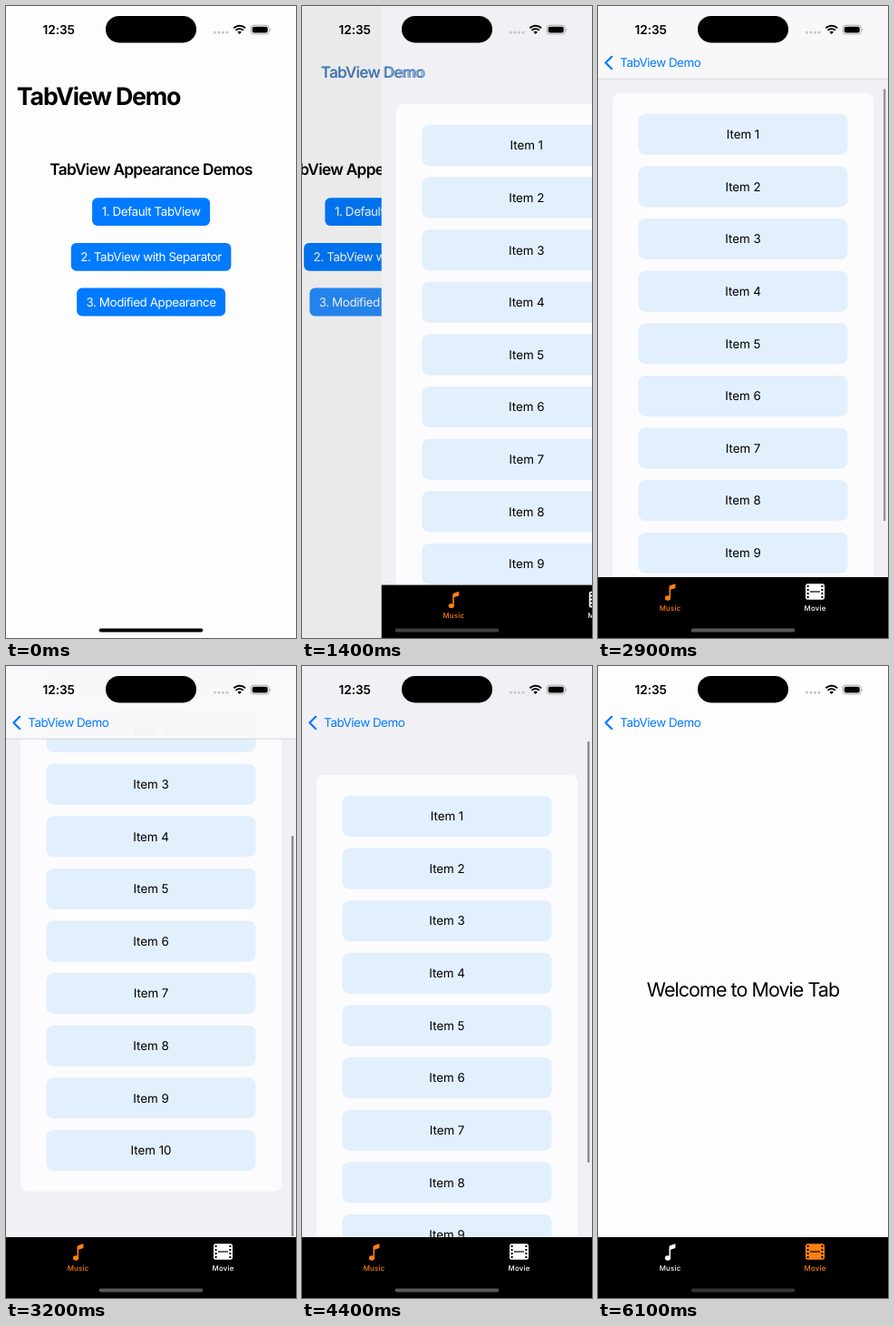
These frames come from a looping animation (320x696 px, 6.5 s). An HTML page:

```html
<!DOCTYPE html>
<html lang="en">
<head>
<meta charset="utf-8">
<title>Tab demo</title>
<style>
  html, body { margin: 0; height: 100%; overflow: hidden; background: #fdfdfe; }
  svg { display: block; width: 100vw; height: 100vh; }
  text {
    font: 13.4px Inter, "Open Sans", sans-serif;
    font-optical-sizing: none;
    text-rendering: geometricPrecision;
  }
  .mid { text-anchor: middle; }
  .heading { font-size: 17.3px; font-weight: 600; letter-spacing: -.7px; }
  .button rect { fill: #007aff; }
  .button text { fill: #fff; letter-spacing: -.4px; }
  .row rect { fill: #e2effc; }
  .row text { letter-spacing: -.05px; }
  .welcome { font-size: 21.5px; letter-spacing: -.96px; }
  .large { font-size: 26.8px; font-weight: 700; letter-spacing: -1.2px; }
  .back { fill: #007aff; letter-spacing: -.48px; }
  .tab text { font-size: 7.9px; font-weight: 500; letter-spacing: .2px; }
  .clock { font-size: 13.7px; font-weight: 600; letter-spacing: -.1px; }
</style>
</head>
<body>
<svg viewBox="0 0 320 696">
  <g id="home">
    <rect width="416" height="696" fill="#fdfdfe"/>
    <text class="mid heading" x="160" y="186">TabView Appearance Demos</text>
  </g>
  <rect id="dim" width="320" height="696"/>

  <g id="page">
    <g id="music">
      <rect width="320" height="696" fill="#f1f1f5"/>
      <g id="list"><rect x="16" y="108" width="288" height="609.4" rx="8" fill="#fcfcfe"/></g>
      <g id="bar">
        <rect width="320" height="80" fill="#f9f9fb" opacity=".97"/>
        <rect y="79.8" width="320" height=".7" fill="#c9c9cd"/>
      </g>
      <rect id="scroller" x="314.9" width="2.5" rx="1.25" fill="#8c8c90"/>
    </g>
    <g id="movie">
      <rect width="320" height="696" fill="#fdfdfe"/>
      <text class="mid welcome" x="160" y="363.7">Welcome to Movie Tab</text>
    </g>
    <g id="tabs">
      <rect y="629" width="320" height="80"/>
      <g class="tab" id="musicTab">
        <ellipse cx="77" cy="652" rx="3.1" ry="2.7"/>
        <path d="M78.5 652V640Q78.5 638.4 80 637.9L85.4 636.2V640.9L80.1 642.7V652Z"/>
        <text class="mid" x="79.6" y="665.8">Music</text>
      </g>
      <g class="tab" id="movieTab">
        <rect x="229" y="636.2" width="21" height="17.6" rx="2.2"/>
        <path d="M231.6 638V653M247.4 638V653" stroke="#000" stroke-width="2" stroke-dasharray="1.9 2.1"/>
        <path d="M234 645H245" stroke="#000" stroke-width="1.2"/>
        <text class="mid" x="239.6" y="665.8">Movie</text>
      </g>
    </g>
  </g>

  <path id="chevron" d="M15.2 55.8L8.4 62.5L15.2 69.2" fill="none" stroke="#007aff" stroke-width="2.2" stroke-linecap="round" stroke-linejoin="round"/>
  <text class="back" id="back">TabView Demo</text>
  <text class="large" id="large">TabView Demo</text>

  <g id="status">
    <text class="clock" x="40.6" y="31">12:35</text>
    <rect x="110" y="11" width="100" height="29.4" rx="14.7"/>
    <path d="M230.5 29.2h14" stroke="#c4c4c7" stroke-width="2.9" stroke-linecap="round" stroke-dasharray="0 4.5"/>
    <path d="M257.7 31L255.5 28.7A3.2 3.2 0 0 1 259.9 28.7Z"/>
    <path d="M253.6 26.8A5.8 5.8 0 0 1 261.8 26.8M251.3 24.4A9.1 9.1 0 0 1 264.1 24.4" fill="none" stroke="#000" stroke-width="1.9"/>
    <rect x="270.2" y="21.2" width="20" height="9.8" rx="3" fill="none" stroke="#a2a2a5" stroke-width=".9"/>
    <rect x="271.7" y="22.7" width="17" height="6.8" rx="1.9"/>
    <path d="M291.4 24.4Q293.2 26.1 291.4 27.8Z" fill="#a2a2a5"/>
  </g>
  <rect id="indicator" x="102.7" y="685.6" width="114.6" height="4" rx="2"/>
</svg>

<script>
const LOOP = 6500, PUSH = 1230, SETTLED = 1790, SWITCH = 5500;
const SCROLL_DOWN = 2830, SCROLL_UP = 4130, MAX_SCROLL = 103.6, OVERSHOOT = 35;
const $ = id => document.getElementById(id);
const clamp = v => Math.min(1, Math.max(0, v));
const mix = (a, b, p) => a + (b - a) * p;
const set = (id, attrs) => {
  for (const name in attrs) $(id).setAttribute(name, attrs[name]);
};
const gray = v => `rgb(${v},${v},${v})`;

const box = (kind, label, x, y, w, h, r) => `<g class="${kind}">
  <rect x="${x}" y="${y}" width="${w}" height="${h}" rx="${r}"/>
  <text class="mid" x="${x + w / 2}" y="${y + h / 2 + 4.8}">${label}</text></g>`;

const buttons = [["Default TabView", 130], ["TabView with Separator", 176.6], ["Modified Appearance", 164]];
$("home").innerHTML += buttons.map(([label, w], i) =>
  box("button", `${i + 1}. ${label}`, 160.1 - w / 2, 211.2 + 49.7 * i, w, 30.8, 5.8)).join("");
$("list").innerHTML += Array.from({ length: 10 }, (_, i) =>
  box("row", `Item ${i + 1}`, 44.5, 131 + 57.62 * i, 231, 45, 8)).join("");
const pressed = $("home").lastElementChild;

// Critically damped push, 0 to 1
function pushAt(t) {
  if (t < PUSH) return 0;
  if (t > 1850) return 1;
  const k = (t - PUSH) * .015;
  return 1 - (1 + k) * Math.exp(-k);
}

// Drag past the end, then spring back to it
function flick(ms) {
  if (ms < 0) return 0;
  const drag = 370;
  if (ms < drag) return (MAX_SCROLL + OVERSHOOT) * (1 - Math.cos(Math.PI * ms / drag)) / 2;
  const k = (ms - drag) * .0117;
  return MAX_SCROLL + OVERSHOOT * (1 + k) * Math.exp(-k);
}

function draw(t) {
  const p = pushAt(t);
  set("home", { transform: `translate(${-96 * p})` });
  set("dim", { opacity: .1 * p });
  set("page", { transform: `translate(${320 * (1 - p)})`, visibility: p ? "visible" : "hidden" });
  pressed.setAttribute("opacity", t < 1100 ? 1 : mix(.75, 1, clamp((t - PUSH) / 450)));

  // Large title turns into the back label
  const x = mix(11.8, 24.3, p), y = mix(109.3, 67.2, p);
  set("large", { transform: `translate(${x} ${y}) scale(${mix(1, .484, p)})`, opacity: 1 - p });
  set("back", { transform: `translate(${x} ${y}) scale(${mix(2.07, 1, p)})`, opacity: p });
  set("chevron", { opacity: clamp((p - .8) * 5) });

  const offset = flick(t - SCROLL_DOWN) - flick(t - SCROLL_UP);
  const inside = Math.min(MAX_SCROLL, Math.max(0, offset));
  const over = Math.abs(offset - inside);
  const top = mix(83, 152, inside / MAX_SCROLL) + (offset > MAX_SCROLL ? over : 0);
  set("list", { transform: `translate(0 ${-offset})` });
  set("bar", { opacity: clamp(offset / 14) });
  set("scroller", { y: top, height: 476 - over, opacity: clamp((t - SCROLL_DOWN) / 80) });

  const onMovie = t >= SWITCH;
  set("movie", { display: onMovie ? "inline" : "none" });
  set("tabs", { transform: `translate(0 ${t < SETTLED ? 8.6 : 0})` });
  set("musicTab", { fill: onMovie ? "#fff" : "#ff7f12" });
  set("movieTab", { fill: onMovie ? "#ff7f12" : "#fff" });
  set("indicator", { fill: gray(mix(88 * p, 52, clamp((t - SWITCH) / 600))) });
}

function tick(now) {
  draw(now % LOOP);
  requestAnimationFrame(tick);
}
draw(0);
requestAnimationFrame(tick);
</script>
</body>
</html>
```
